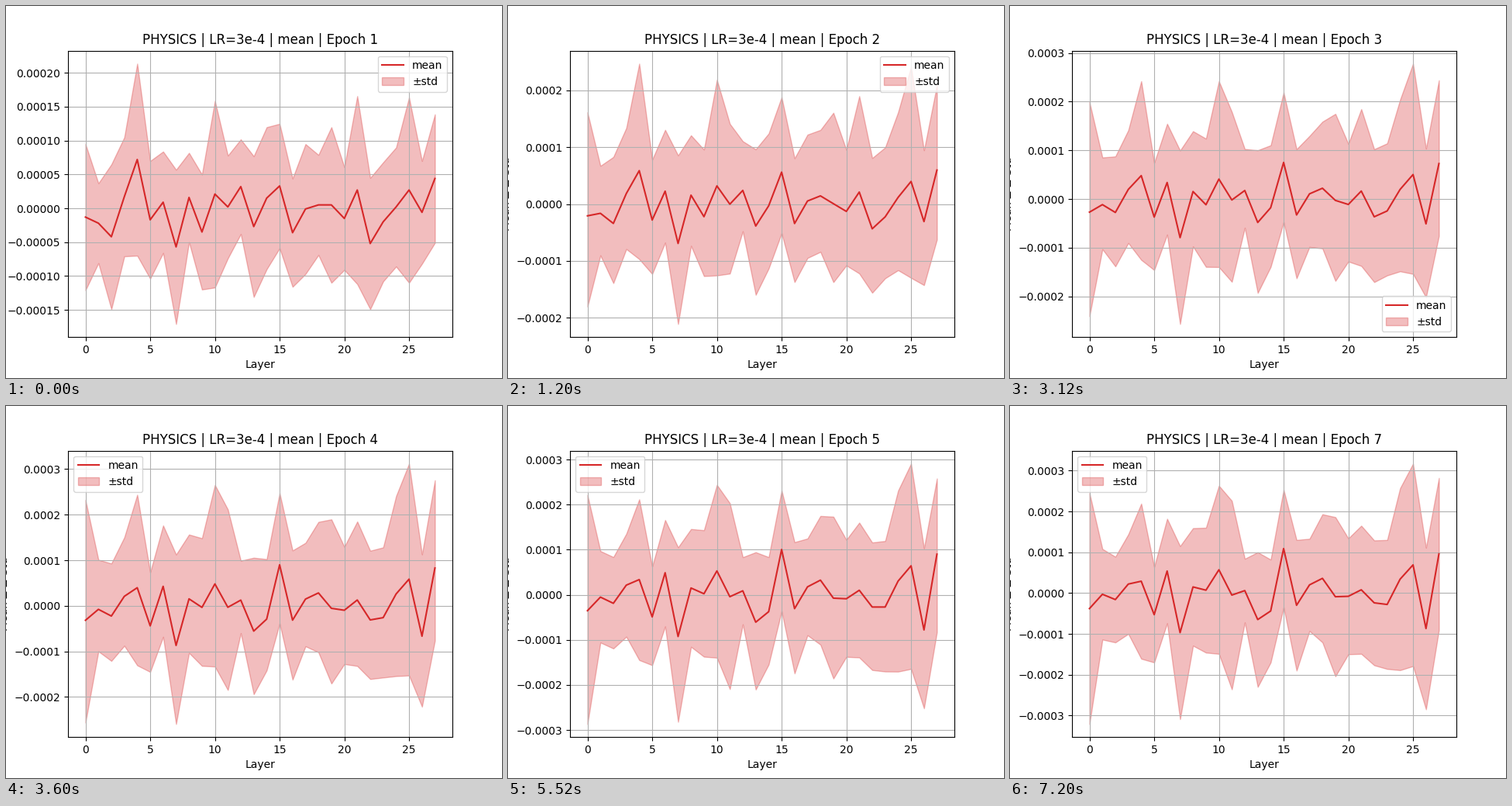
Write a matplotlib script that moves like this. It is 640 by 480 pixels and loops after 8000 ms.

```python
import matplotlib.pyplot as plt
import numpy as np
from matplotlib.animation import FuncAnimation

STEP_MS = 400
STEPS_PER_EPOCH = 3
TOTAL_STEPS = 20
COLOR = "tab:red"
UNIT = 1e-6

# Layer profiles at the first and the last epoch, in millionths.
mean_first = [-13, -22, -42, 17, 72, -17, 9, -57, 16, -35, 21, 2, 32, -27,
              15, 33, -36, -1, 5, 5, -15, 27, -52, -20, 2, 27, -6, 44]
mean_last = [-38, -3, -16, 22, 29, -53, 54, -97, 15, 7, 57, -5, 6, -65,
             -44, 109, -30, 20, 36, -9, -8, 8, -24, -28, 34, 69, -87, 96]
std_first = [108, 59, 107, 88, 142, 87, 75, 114, 66, 85, 138, 76, 70, 104,
             105, 92, 80, 96, 74, 115, 76, 139, 97, 88, 88, 137, 76, 95]
std_last = [283, 111, 105, 122, 190, 117, 128, 212, 144, 153, 206, 231, 78, 165,
            126, 144, 160, 113, 157, 195, 142, 157, 153, 158, 223, 248, 198, 186]

# Highest and lowest point of the band in each epoch.
PEAKS = [213.5, 247, 278, 311.9, 291, 305.5, 317]
TROUGHS = [-170.9, -211, -256.7, -259.5, -286.8, -311, -321]
LEGEND_SPOTS = ["upper right"] * 2 + ["lower right"] + ["upper left"] * 4

fig, ax = plt.subplots(figsize=(6.4, 4.8), dpi=100)


def blend(first, last, amount):
    return (1 - amount) * np.array(first) + amount * np.array(last)


def band(epoch):
    """Mean and band edges: training drifts quickly at first, then settles."""
    settled = 1 - (1 - epoch / (len(PEAKS) - 1)) ** 2
    mean = blend(mean_first, mean_last, settled)
    std = blend(std_first, std_last, settled)
    upper, lower = mean + std, mean - std
    upper *= PEAKS[epoch] / upper.max()
    lower *= TROUGHS[epoch] / lower.min()
    return mean * UNIT, upper * UNIT, lower * UNIT


def draw(step):
    epoch = step // STEPS_PER_EPOCH
    mean, upper, lower = band(epoch)
    layers = np.arange(len(mean))

    ax.clear()
    ax.plot(layers, mean, color=COLOR, label="mean")
    ax.fill_between(layers, lower, upper, color=COLOR, alpha=0.3, label="±std")
    ax.set_title(f"PHYSICS | LR=3e-4 | mean | Epoch {epoch + 1}")
    ax.set_xlabel("Layer")
    ax.set_ylabel("Mean Δ ± Std")
    ax.grid(True)
    ax.legend(loc=LEGEND_SPOTS[epoch])


anim = FuncAnimation(fig, draw, frames=TOTAL_STEPS, init_func=lambda: draw(0),
                     interval=STEP_MS, repeat=True, repeat_delay=0)
plt.show()
```
